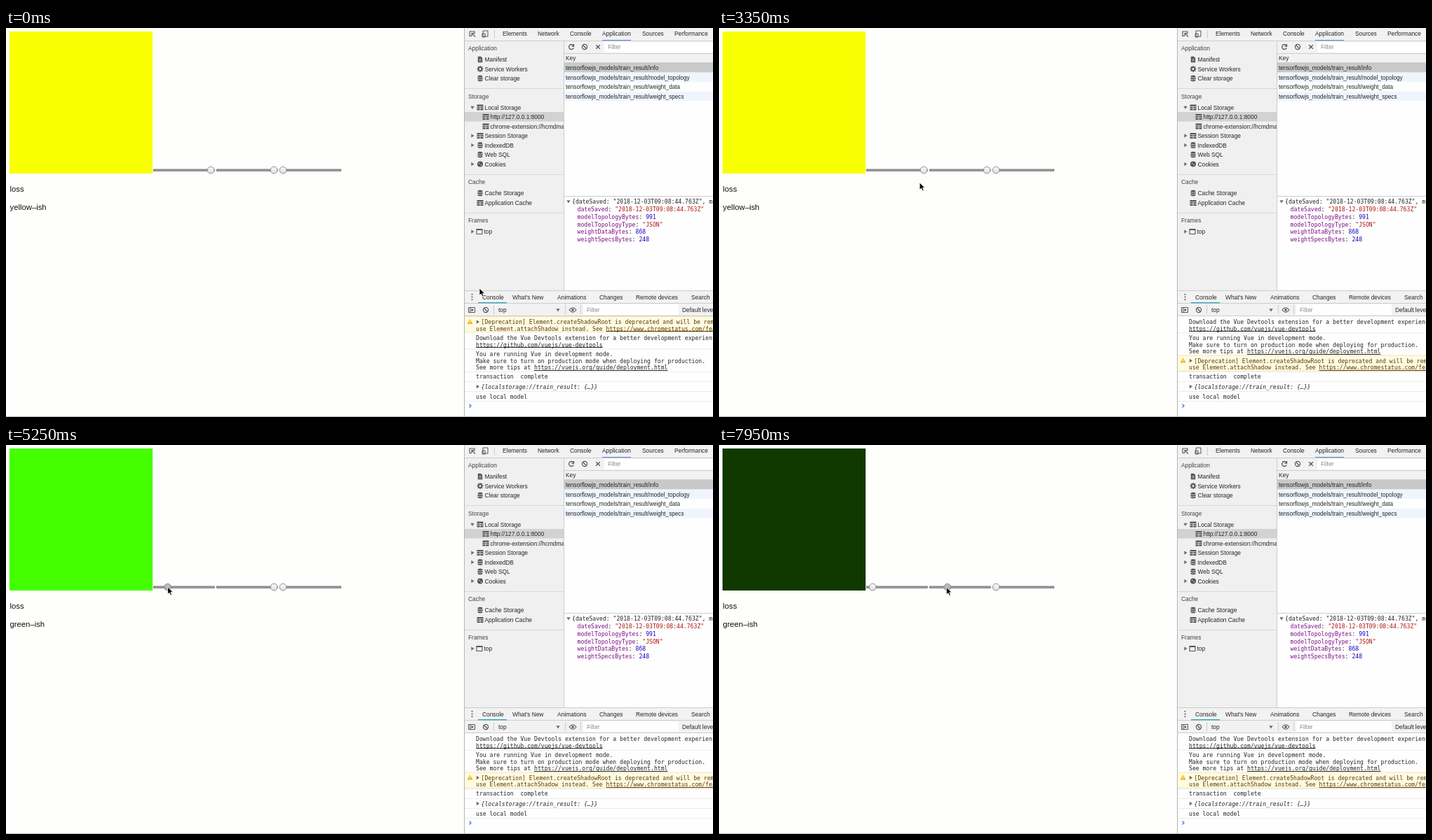
Animation, 1008 px wide and 556 px high, one loop 8000 ms. Source, as an HTML page with a canvas:

```html
<!DOCTYPE html>
<html lang="en">
<meta charset="utf-8">
<title>Color sliders</title>
<style>
  html, body { margin: 0; width: 1008px; height: 556px; overflow: hidden; background: #fefefc }
  canvas { display: block }
</style>
<canvas id="stage" width="1008" height="556"></canvas>
<script>
const ctx = document.getElementById('stage').getContext('2d');
const SANS = '8.4px "Liberation Sans", Arial, sans-serif';
const TABLE = '8.18px "Liberation Sans", Arial, sans-serif';
const MONO = '8.12px "DejaVu Sans Mono", monospace';
const PAGE = '11.3px "Liberation Sans", Arial, sans-serif';
const INK = '#262626', ICON = '#555', PANEL = '#f2f2f2', LINE = '#cdcdcd';

function rect(x, y, w, h, color) {
  ctx.fillStyle = color;
  ctx.fillRect(x, y, w, h);
}

// Writes text centred on y and returns the x where it ends.
function text(str, x, y, color = INK, font = SANS) {
  ctx.font = font;
  ctx.fillStyle = color;
  ctx.fillText(str, x, y + 3);
  return x + ctx.measureText(str).width;
}
const mono = (str, x, y, color = INK) => text(str, x, y, color, MONO);

function link(str, x, y, color = INK) {
  const end = mono(str, x, y, color);
  rect(x, Math.round(y + 3.5), end - x, 1, color);
}

function shape(points, fill, stroke, width = 1) {
  ctx.beginPath();
  points.forEach(([x, y]) => ctx.lineTo(x, y));
  ctx.closePath();
  if (fill) { ctx.fillStyle = fill; ctx.fill(); }
  if (stroke) { ctx.strokeStyle = stroke; ctx.lineWidth = width; ctx.stroke(); }
}

function path(d, x, y, color = ICON, width = 1.1) {
  ctx.save();
  ctx.translate(x, y);
  ctx.strokeStyle = color;
  ctx.lineWidth = width;
  ctx.stroke(new Path2D(d));
  ctx.restore();
}

function circle(x, y, r, fill, stroke, width = 1) {
  ctx.beginPath();
  ctx.arc(x, y, r, 0, 7);
  if (fill) { ctx.fillStyle = fill; ctx.fill(); }
  if (stroke) { ctx.strokeStyle = stroke; ctx.lineWidth = width; ctx.stroke(); }
}

function arrow(x, y, open) {
  shape(open ? [[x - 2.7, y - 1.7], [x + 2.7, y - 1.7], [x, y + 2.5]]
             : [[x - 1.7, y - 2.7], [x - 1.7, y + 2.7], [x + 2.5, y]], '#6e6e6e');
}

const icons = {
  grid(x, y) {
    rect(x - 4.5, y - 4, 9, 8, ICON);
    rect(x - 4.5, y - 1.7, 9, 0.8, PANEL);
    rect(x - 4.5, y + 1, 9, 0.8, PANEL);
    rect(x - 0.4, y - 1.7, 0.8, 6, PANEL);
  },
  disk(x, y) {
    ctx.fillStyle = ICON;
    ctx.beginPath();
    ctx.roundRect(x - 3.5, y - 4.3, 7, 8.6, 2.2);
    ctx.fill();
    path('M-3.5-1.6Q0 0 3.5-1.6M-3.5 1.3Q0 2.9 3.5 1.3', x, y, PANEL, 0.8);
  },
  page(x, y) {
    shape([[x - 3.2, y - 4.2], [x + 1, y - 4.2], [x + 3.2, y - 2], [x + 3.2, y + 4.2], [x - 3.2, y + 4.2]], ICON);
    path('M-1.6-.4H1.6M-1.6 1.8H1.6', x, y, PANEL, 0.8);
  },
  gear(x, y) {
    path('M0-4.5V4.5M-4.5 0H4.5M-3.2-3.2L3.2 3.2M-3.2 3.2L3.2-3.2', x, y, ICON, 1.5);
    circle(x, y, 2.4, PANEL, ICON, 1.7);
  },
  cookie(x, y) {
    circle(x, y, 4, ICON);
    circle(x - 1.3, y - 1, 0.8, PANEL);
    circle(x + 1.3, y + 1.2, 0.8, PANEL);
  },
  frame(x, y) {
    path('M-4-3.5H4V3.5H-4ZM-4-2.5H4', x, y);
  }
};

function block(x, y) {
  circle(x, y, 3.6, null, ICON, 1.2);
  path('M-2.5-2.5L2.5 2.5', x, y, ICON, 1.2);
}

function tabBar() {
  rect(654, 0, 354, 18, PANEL);
  rect(654, 18, 354, 1, LINE);
  path('M3 0V-3.5H-4V3H-1M-1-1L4 4M-1 2.5V-1H2.5', 665, 8.5);
  path('M-4-4H3V4H-4ZM-5 0H-1V5H-5Z', 684, 8, ICON, 1);
  rect(696, 3, 1, 12, LINE);
  [['Elements', 708], ['Network', 758], ['Console', 804], ['Application', 850],
   ['Sources', 907], ['Performance', 953]].forEach(([name, x]) => text(name, x, 8));
  rect(850, 17, 41, 1, '#4a8ce0');
}

function sidebar() {
  rect(654, 19, 141, 357, '#f0f0f0');
  rect(654, 120, 141, 13.5, '#d2d2d2');
  [86, 209, 264].forEach(y => rect(654, y, 141, 1, '#d8d8d8'));
  [['Application', 29], ['Storage', 98], ['Cache', 220], ['Frames', 275]]
    .forEach(([name, y]) => text(name, 659, y, '#444'));
  ctx.save();
  ctx.beginPath();
  ctx.rect(654, 19, 141, 357);
  ctx.clip();
  [['Manifest', 676, 45, 'page'], ['Service Workers', 676, 58.5, 'gear'], ['Clear storage', 676, 72, 'disk'],
   ['Local Storage', 676, 113.5, 'grid', 1], ['http://127.0.0.1:8000', 684, 127, 'grid'],
   ['chrome-extension://hcmdmaeb', 684, 140.5, 'grid'], ['Session Storage', 676, 154, 'grid', 0],
   ['IndexedDB', 676, 167.5, 'disk', 0], ['Web SQL', 676, 181, 'disk'], ['Cookies', 676, 194.5, 'cookie', 0],
   ['Cache Storage', 676, 236, 'disk'], ['Application Cache', 676, 250, 'grid'], ['top', 675, 291, 'frame', 0]
  ].forEach(([name, x, y, icon, open]) => {
    icons[icon](x, y);
    text(name, x + 6.5, y);
    if (open !== undefined) arrow(665, y, open);
  });
  ctx.restore();
}

function storageTable() {
  rect(795, 19, 213, 357, '#fefefe');
  rect(796, 19, 212, 30, PANEL);
  [36, 49, 240].forEach(y => rect(796, y, 212, 1, LINE));
  rect(795, 19, 1, 357, LINE);
  path('M3.3-1.5A3.5 3.5 0 1 0 3.3 1.5M3.5-4V-.8H.5', 806, 27, ICON, 1.3);
  block(825, 27);
  path('M-2.8-2.8L2.8 2.8M-2.8 2.8L2.8-2.8', 844, 27, ICON, 1.3);
  rect(853, 20, 155, 15, '#fff');
  text('Filter', 858, 27, '#8a8a8a');
  text('Key', 798, 43);
  ['info', 'model_topology', 'weight_data', 'weight_specs'].forEach((name, i) => {
    rect(796, 50 + i * 13.6, 212, 13.6, ['#c9c9c9', '#f0f5fd', '#fefefe', '#f0f5fd'][i]);
    text('tensorflowjs_models/train_result/' + name, 798, 57 + i * 13.6, INK, TABLE);
  });
  arrow(802, 248, true);
  mono('{dateSaved: "2018-12-03T09:08:44.763Z", modelTopologyBytes: 991', 807, 248);
  [['dateSaved', '"2018-12-03T09:08:44.763Z"'], ['modelTopologyBytes', '991'], ['modelTopologyType', '"JSON"'],
   ['weightDataBytes', '868'], ['weightSpecsBytes', '248']].forEach(([key, value], i) => {
    const y = 259 + i * 10.8;
    const x = mono(': ', mono(key, 814.5, y, '#7d0f86'), y);
    mono(value, x, y, value[0] === '"' ? '#b01612' : '#1c00bf');
  });
}

function warning(y) {
  rect(654, y - 7.5, 354, 22, '#fffbe3');
  rect(654, y - 8, 354, 1, '#f5e8b5');
  rect(654, y + 14, 354, 1, '#f5e8b5');
  shape([[661.5, y - 4], [665.5, y + 3], [657.5, y + 3]], '#f0b400');
  rect(661, y - 1.8, 1, 2.4, '#fff');
  rect(661, y + 1.2, 1, 1, '#fff');
  arrow(672.5, y, false);
  const brown = '#5c3b00';
  mono('[Deprecation] Element.createShadowRoot is deprecated and will be removed', 677.5, y, brown);
  link('https://www.chromestatus.com/features', mono('use Element.attachShadow instead. See ', 670, y + 9.5, brown), y + 9.5, brown);
}

function vueMessages(y) {
  mono('Download the Vue Devtools extension for a better development experience:', 670, y);
  link('https://github.com/vuejs/vue-devtools', 670, y + 9.5);
  rect(654, y + 15.5, 354, 1, '#ececec');
  mono('You are running Vue in development mode.', 670, y + 23);
  mono('Make sure to turn on production mode when deploying for production.', 670, y + 32.5);
  link('https://vuejs.org/guide/deployment.html', mono('See more tips at ', 670, y + 42), y + 42);
}

function consoleDrawer(reloaded) {
  rect(654, 376, 354, 35, PANEL);
  [375, 393, 411].forEach(y => rect(654, y, 354, 1, LINE));
  [380.8, 384.5, 388.2].forEach(y => circle(664.5, y, 1, ICON));
  [['Console', 679], ["What's New", 722], ['Animations', 786], ['Changes', 846],
   ['Remote devices', 898], ['Search', 977]].forEach(([name, x]) => text(name, x, 384.5));
  rect(673, 392, 41, 1.3, '#26a5bd');

  path('M-4.5-3.5H4.5V3.5H-4.5ZM-2.2-3.5V3.5', 664, 403, ICON, 1);
  shape([[663.5, 400.8], [663.5, 405.2], [667, 403]], ICON);
  block(684, 403);
  rect(695, 396, 1, 13, LINE);
  text('top', 702, 403);
  arrow(787, 403, true);
  rect(797, 396, 1, 13, LINE);
  path('M-5 0Q0-6.5 5 0Q0 6.5-5 0Z', 808, 403);
  circle(808, 403, 1.8, ICON);
  rect(819, 396, 1, 13, LINE);
  rect(823, 395, 136, 15, '#fff');
  text('Filter', 828, 403, '#8a8a8a');
  text('Default levels', 964, 403);

  rect(654, 412, 354, 144, '#fefefe');
  vueMessages(reloaded ? 420 : 443);
  warning(reloaded ? 475.5 : 420);
  [491, 505, 519, 533].forEach(y => rect(654, y, 354, 1, '#ececec'));
  mono('transaction  complete', 670, 498);
  arrow(672.5, 512.5, false);
  text('{localstorage://train_result: {…}}', 677.5, 512.5, INK, 'italic ' + MONO);
  mono('use local model', 670, 526.5);
  path('M-1.5-2.5L1 0L-1.5 2.5', 662, 540, '#367cf1', 1.3);
}

function slider(left, thumb, pressed) {
  rect(left, 201.6, 87.5, 3.2, '#686868');
  rect(left + 0.8, 202.7, 86, 1.1, '#b9b9b9');
  const shade = ctx.createLinearGradient(0, 198, 0, 208);
  shade.addColorStop(0, pressed ? '#c4c4c4' : '#fbfbfb');
  shade.addColorStop(1, pressed ? '#a0a0a0' : '#dcdcdc');
  circle(thumb, 203.1, 4.9, shade, '#858585', 0.9);
}

function pointer(x, y) {
  shape([[0, 0], [0, 10.2], [2.4, 8.1], [4, 11.8], [5.9, 11], [4.3, 7.4], [7.4, 7.2]]
    .map(([dx, dy]) => [x + dx, y + dy]), '#000', '#fff', 0.8);
}

// Pointer stops: time, x, y
const STOPS = [
  [0, 675, 372], [300, 675, 372], [1200, 651, 370], [1900, 651, 370],
  [3100, 286, 221], [3350, 286, 221], [3750, 292, 203], [3950, 292, 203],
  [4350, 281, 203], [5250, 230.5, 203], [5550, 219, 203], [5800, 219, 203],
  [6500, 380.5, 203], [6750, 380.5, 203], [7150, 368.7, 203], [8000, 321.5, 203.5]
];

function pointerAt(t) {
  const i = STOPS.findIndex(stop => stop[0] > t);
  const [t0, x0, y0] = STOPS[i - 1], [t1, x1, y1] = STOPS[i];
  let k = (t - t0) / (t1 - t0);
  const dragging = (t0 >= 3950 && t0 < 5550) || t0 >= 6750;
  if (!dragging) k = k * k * (3 - 2 * k);
  return [x0 + (x1 - x0) * k, y0 + (y1 - y0) * k];
}

function draw(t) {
  const [x, y] = pointerAt(t);
  const dragRed = t >= 3950 && t < 5600, dragGreen = t >= 6750;
  const redThumb = t < 3950 ? 292 : dragRed ? x : 219;
  const greenThumb = dragGreen ? x + 1.5 : 382;
  const red = (redThumb - 215) / 77 * 255;
  // The display profile darkens low greens and bleeds some green into red.
  const green = 255 * ((greenThumb - 305) / 77) ** 1.15;
  const shownRed = ((0.24 * green) ** 4 + (0.975 * red) ** 4) ** 0.25;

  rect(0, 0, 1008, 556, '#fefefc');
  rect(5, 5, 204, 203, `rgb(${shownRed}, ${green}, 0)`);
  slider(210, redThumb, dragRed);
  slider(300, greenThumb, dragGreen);
  slider(390.5, 395, false);
  text('loss', 5.5, 231, '#111', PAGE);
  text(red > 225 ? 'yellow–ish' : 'green–ish', 5.5, 257, '#111', PAGE);

  tabBar();
  sidebar();
  storageTable();
  consoleDrawer(t >= 850);
  rect(653, 0, 1, 556, '#b5b5b5');
  rect(0, 555, 1008, 1, '#b5b5b5');
  pointer(x, y);
}

function loop() {
  draw(Math.floor(performance.now() % 8000 / 50) * 50);
  requestAnimationFrame(loop);
}
loop();
</script>
</html>
```
